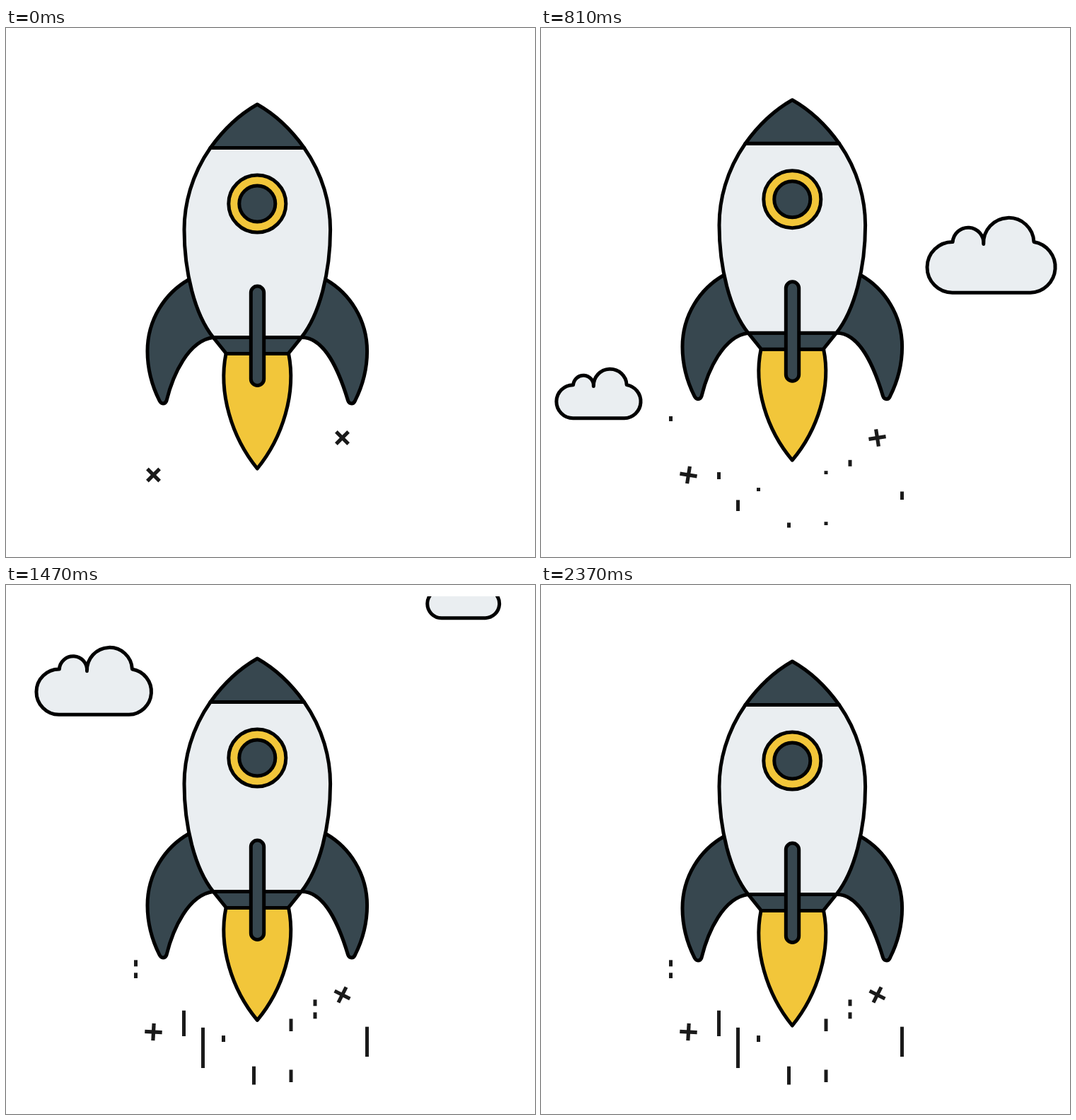
These frames come from a looping animation (748x748 px, 2400 ms). An HTML page with a canvas:

```html
<!DOCTYPE html>
<html>
<head>
<meta charset="utf-8">
<title>Rocket</title>
<style>
  html, body { margin: 0; width: 100%; height: 100%; overflow: hidden; background: #fff; }
  canvas { display: block; }
</style>
</head>
<body>
<canvas id="stage" width="748" height="748"></canvas>
<script>
const ctx = document.getElementById('stage').getContext('2d');
const LOOP = 2400, STEP = 30, SPIN = 900, AXIS = 355.3;
const DARK = '#37474f', PALE = '#eaeef1', YELLOW = '#f2c63a', INK = '#1a1a1a';

// x, bottom, full length, dashed
const streaks = [
  [251.5, 638, 99], [278.5, 683, 156], [350.5, 706.5, 70.5], [510.5, 667, 115.5],
  [403, 631, 48], [403, 703, 48],
  [183.5, 556, 70, true], [437, 620, 92, true], [307.5, 655, 49, true]
];
// x, y at the given time, time, speed in px/ms, scale
const clouds = [
  [21.5, 359.7, 630, 0.675, 0.66], [545.5, 97.7, 630, 0.94, 1.003],
  [42.5, 260.7, 1680, 0.827, 0.9], [595.5, 162.7, 1680, 0.84, 0.564]
];
// time within one hop, height
const hop = [[0, 0], [30, 4], [60, 5.3], [150, 11], [240, 11], [450, 0], [480, 0]];

const cloudPath = new Path2D('M36.5 35.5A21.7 21.7 0 0 1 80 38.5A35.5 35.5 0 0 1 151 35.5' +
  'A36 36 0 0 1 146 107H36A35.7 35.7 0 0 1 36.5 35.5Z');
const leftFin = new Path2D('M258 356C225 375 200 412 200 457C200 482 207 507 217 527' +
  'Q219 531 222 531Q225.500 531 227 527C236 490 258 442 293 437.500L300 400Z');
const rightFin = new Path2D('M452.600 356C485.600 375 510.600 412 510.600 457C510.600 482 503.600 507 493.600 527' +
  'Q492 531 488.600 531Q485 531 483.600 527C470 482 450 437 417.600 437.500L410 400Z');
const flame = new Path2D('M311 0C300 55 319 118 355.300 162.500C391.600 118 410.600 55 399.600 0Z');
const hull = new Path2D('M289 169.500C262 208 252 250 252 285C252 345 267 405 293 437.500' +
  'H417.600C443.600 405 458.600 345 458.600 285C458.600 250 448.600 208 421.600 169.500Z');
const nose = new Path2D('M355.300 108C327 124 305 147 289 169.500H421.600C405.600 147 383.600 124 355.300 108Z');
const skirt = new Path2D('M293 437.500L311.500 460.500H399.100L417.600 437.500Z');
const strut = new Path2D();
strut.roundRect(346.3, 365, 18.4, 140.5, 9.2);

function paint(path, fill) {
  ctx.fillStyle = fill;
  ctx.fill(path);
  ctx.stroke(path);
}

// Scales the shape but keeps the outline width even.
function paintAt(path, fill, x, y, sx, sy) {
  const placed = new Path2D();
  placed.addPath(path, new DOMMatrix([sx, 0, 0, sy, x, y]));
  paint(placed, fill);
}

function disc(radius, fill) {
  const path = new Path2D();
  path.arc(AXIS, 248.5, radius, 0, 2 * Math.PI);
  paint(path, fill);
}

function cross(x, y, degrees) {
  ctx.save();
  ctx.translate(x, y);
  ctx.rotate(degrees * Math.PI / 180);
  ctx.fillStyle = INK;
  ctx.fillRect(-12.2, -2.6, 24.4, 5.2);
  ctx.fillRect(-2.6, -12.2, 5.2, 24.4);
  ctx.restore();
}

function riseAt(t) {
  const p = t % 480;
  const i = hop.findIndex(key => key[0] > p);
  const [t0, y0] = hop[i - 1], [t1, y1] = hop[i];
  return y0 + (y1 - y0) * (p - t0) / (t1 - t0);
}

function drawStreaks(t) {
  const left = 1 - (t % SPIN || SPIN) / SPIN;
  ctx.strokeStyle = INK;
  for (const [x, bottom, length, dashed] of streaks) {
    ctx.setLineDash(dashed ? [9, 9] : []);
    ctx.beginPath();
    ctx.moveTo(x, bottom - length * left);
    ctx.lineTo(x, bottom);
    if (left > 0) ctx.stroke();
  }
  ctx.setLineDash([]);
}

function drawClouds(t) {
  ctx.save();
  ctx.beginPath();
  ctx.rect(0, 16, 748, 719);
  ctx.clip();
  for (const [x, y, time, speed, scale] of clouds)
    paintAt(cloudPath, PALE, x, y + speed * (t - time), scale, scale);
  ctx.restore();
}

function drawRocket(rise) {
  ctx.save();
  ctx.translate(0, -rise);
  paintAt(flame, YELLOW, 0, 460.5, 1, 1 - 0.9 * rise / 162.5);
  paint(leftFin, DARK);
  paint(rightFin, DARK);
  paint(skirt, DARK);
  paint(hull, PALE);
  paint(nose, DARK);
  disc(40.5, YELLOW);
  disc(25.5, DARK);
  paint(strut, DARK);
  ctx.restore();
}

function draw(now) {
  const t = Math.floor(now % LOOP / STEP) * STEP;
  ctx.fillStyle = '#fff';
  ctx.fillRect(0, 0, 748, 748);
  ctx.lineWidth = 5;
  ctx.lineJoin = 'round';
  drawStreaks(t);
  cross(208.5, 632, 45 + t * 0.4);
  cross(475.5, 579.5, 45 + t * 0.6);
  ctx.strokeStyle = '#000';
  drawClouds(t);
  drawRocket(riseAt(t));
}

const start = performance.now();
function tick() {
  draw(performance.now() - start);
  requestAnimationFrame(tick);
}
tick();
</script>
</body>
</html>
```
